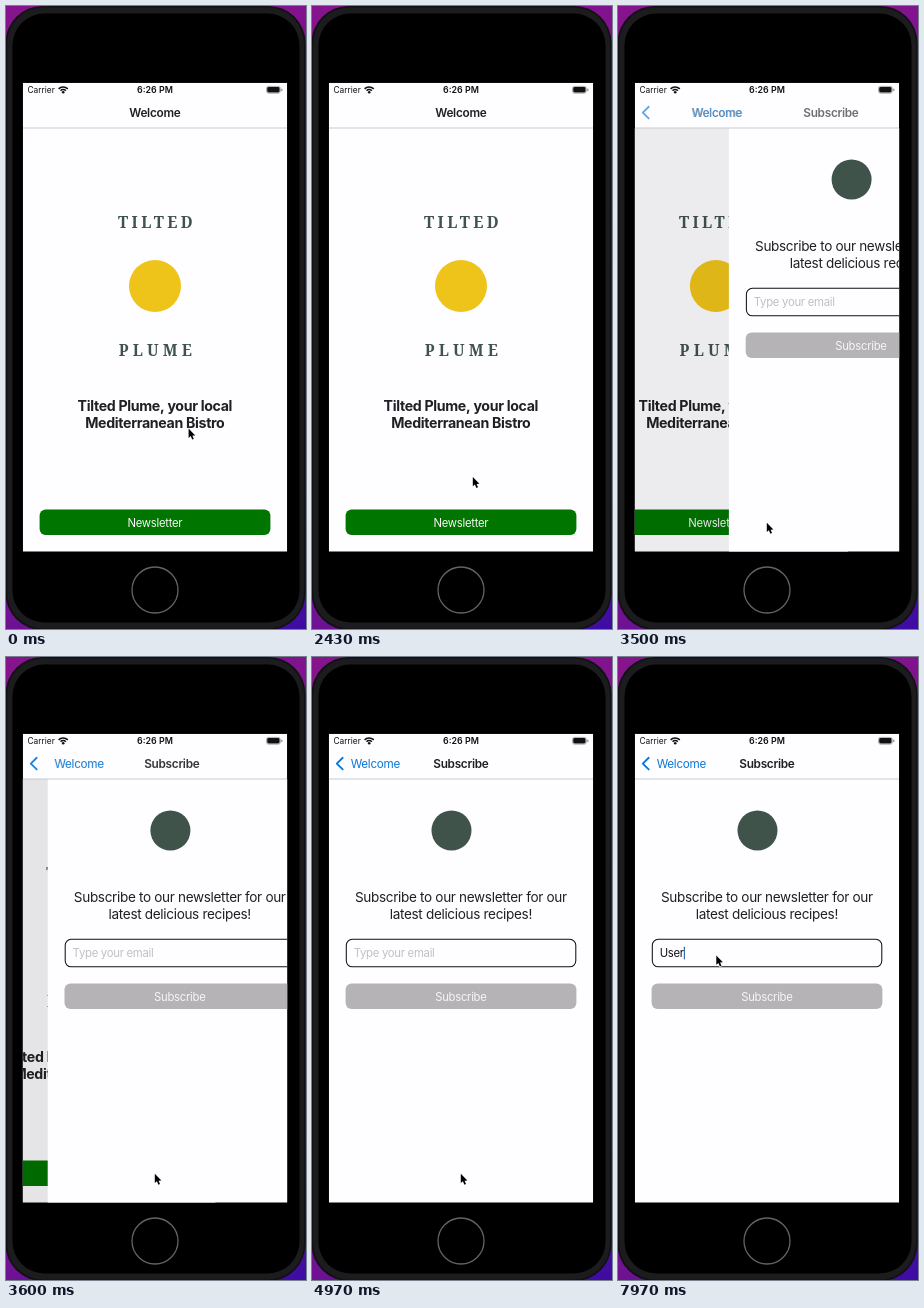
Recreate the animation shown at these times as an HTML page with a canvas. Size 300 by 623 pixels, loop 8 s.

```html
<!DOCTYPE html>
<html lang="en">
<head>
<meta charset="utf-8">
<title>Newsletter sign-up</title>
<style>
  html, body { margin: 0; width: 100%; height: 100%; overflow: hidden; background: #000; }
  canvas { display: block; width: 300px; height: 623px; }
</style>
</head>
<body>
<canvas id="stage"></canvas>
<script>
const W = 300, H = 623, LOOP = 8000;
const SCREEN = { x: 16.8, y: 76.8, w: 264.4, h: 468.8 };
const NAV_BOTTOM = 122;
const BLUE = '#0a78d8', INK = '#202024', GREEN = '#007500', GREY = '#b5b3b6';
const PAPER = '#fefdff', SLATE = '#40534b', YELLOW = '#efc41a';
const SANS = 'Inter, sans-serif', SERIF = '"Noto Serif", serif';

const canvas = document.getElementById('stage');
const ctx = canvas.getContext('2d');
const dpr = window.devicePixelRatio || 1;
canvas.width = W * dpr;
canvas.height = H * dpr;

const clamp = v => Math.max(0, Math.min(1, v));
const smooth = v => { v = clamp(v); return v * v * (3 - 2 * v); };
const mix = (a, b, k) => a + (b - a) * k;

function box(x, y, w, h, r, fill, stroke, line = 1) {
  ctx.beginPath();
  ctx.roundRect(x, y, w, h, r);
  if (fill) { ctx.fillStyle = fill; ctx.fill(); }
  if (stroke) { ctx.strokeStyle = stroke; ctx.lineWidth = line; ctx.stroke(); }
}

function disc(x, y, r, fill, stroke, line = 1) {
  ctx.beginPath();
  ctx.arc(x, y, r, 0, Math.PI * 2);
  if (fill) { ctx.fillStyle = fill; ctx.fill(); }
  if (stroke) { ctx.strokeStyle = stroke; ctx.lineWidth = line; ctx.stroke(); }
}

// Returns the advance width of the text.
function text(str, x, y, size, { weight = 400, color = INK, align = 'center', family = SANS, gap = -0.024 * size } = {}) {
  ctx.font = `${weight} ${size}px ${family}`;
  ctx.letterSpacing = gap + 'px';
  ctx.textAlign = 'left';
  ctx.fillStyle = color;
  const width = ctx.measureText(str).width;
  ctx.fillText(str, align === 'center' ? x - (width - gap) / 2 : x, y);
  return width;
}

function faded(alpha, draw) {
  ctx.save();
  ctx.globalAlpha = clamp(alpha);
  draw();
  ctx.restore();
}

function drawPhone() {
  const wall = ctx.createLinearGradient(0, 0, W, H);
  wall.addColorStop(0, '#86148c');
  wall.addColorStop(0.8, '#701292');
  wall.addColorStop(1, '#3c0ca4');
  ctx.fillStyle = wall;
  ctx.fillRect(0, 0, W, H);
  box(-0.5, 0, 300, 624, 37, '#111013');
  box(1.2, 1.6, 296.8, 621, 36, '#1c1b1d');
  box(6.5, 7.5, 287, 609, 32, '#000');
  disc(149, 584, 23, null, '#646464', 1.3);
}

function drawStatusBar() {
  text('Carrier', 21.5, 87, 8.4, { align: 'left', gap: 0, color: '#111' });
  text('6:26 PM', 149, 87.2, 8.9, { weight: 600, gap: 0, color: '#111' });

  ctx.strokeStyle = '#111';
  ctx.lineWidth = 1.5;
  for (const r of [3.6, 6.3]) {
    ctx.beginPath();
    ctx.arc(57.2, 87.2, r, -Math.PI * 0.76, -Math.PI * 0.24);
    ctx.stroke();
  }
  disc(57.2, 86.2, 1.3, '#111');

  box(260.5, 80.4, 13.8, 6.8, 2, null, '#999', 0.8);
  box(261.2, 81.1, 12.4, 5.4, 1.4, '#111');
  box(275.2, 82.4, 1.2, 2.8, 0.6, '#888');
}

function drawNav(p) {
  ctx.fillStyle = PAPER;
  ctx.fillRect(SCREEN.x, SCREEN.y, SCREEN.w, NAV_BOTTOM - SCREEN.y);
  ctx.fillStyle = '#cbcad0';
  ctx.fillRect(SCREEN.x, NAV_BOTTOM - 0.5, SCREEN.w, 1);

  const titleX = mix(149, 63.5, Math.pow(p, 1.22));
  faded(1 - p, () => text('Welcome', titleX, 110.8, 11.8, { weight: 600 }));
  faded(p, () => {
    text('Welcome', titleX, 110.8, 11.7, { color: BLUE });
    text('Subscribe', mix(329, 149, p), 110.8, 11.8, { weight: 600 });
    ctx.beginPath();
    ctx.moveTo(30.7, 100.8);
    ctx.lineTo(24.8, 106.6);
    ctx.lineTo(30.7, 112.4);
    ctx.strokeStyle = BLUE;
    ctx.lineWidth = 1.9;
    ctx.lineCap = 'round';
    ctx.lineJoin = 'round';
    ctx.stroke();
  });
}

function fillPage() {
  ctx.fillStyle = PAPER;
  ctx.fillRect(SCREEN.x, NAV_BOTTOM, SCREEN.w, SCREEN.h);
}

function drawButton(label, y, fill) {
  box(33.6, y - 0.4, 230.8, 25.5, 6, fill);
  text(label, 149, y + 16.9, 11.3, { color: '#f5f6f5' });
}

function drawWelcome() {
  fillPage();
  const sign = { weight: 800, family: SERIF, color: SLATE };
  text('TILTED', 149.3, 221.5, 15.5, { ...sign, gap: 3.4 });
  text('PLUME', 149.3, 350, 15.5, { ...sign, gap: 4.2 });
  disc(149, 280, 26, YELLOW);
  text('Tilted Plume, your local', 149, 405.1, 14.2, { weight: 700 });
  text('Mediterranean Bistro', 149, 421.8, 14.2, { weight: 700 });
  drawButton('Newsletter', 504, GREEN);
}

const KEYS = [[7020, 'U'], [7330, 's'], [7620, 'e'], [7800, 'r']];

function drawSubscribe(t) {
  fillPage();
  disc(139.5, 173.5, 20, SLATE);
  text('Subscribe to our newsletter for our', 149, 245, 13.55);
  text('latest delicious recipes!', 149, 261.7, 13.55);

  box(34.3, 282.3, 229.5, 27.5, 6, null, '#111', 1.05);
  const typed = KEYS.filter(k => t >= k[0]).map(k => k[1]).join('');
  const width = typed
    ? text(typed, 41.7, 300.2, 11.3, { align: 'left', color: '#111' })
    : 0;
  if (!typed) text('Type your email', 41.7, 300.2, 11.3, { align: 'left', color: '#c0bfc3' });
  if (t >= 6580) box(41.7 + width, 289.8, 1.1, 12.6, 0.5, '#2a5fb4');

  drawButton('Subscribe', 327, GREY);
}

// Critically damped push of the second page.
function pushProgress(t) {
  const s = 17.7 * Math.max(0, t - 3377) / 1000;
  const left = (1 + s) * Math.exp(-s);
  return left < 0.0015 ? 1 : 1 - left;
}

function drawScreen(t) {
  const p = pushProgress(t);
  ctx.save();
  ctx.beginPath();
  ctx.rect(SCREEN.x, SCREEN.y, SCREEN.w, SCREEN.h);
  ctx.clip();
  if (p < 1) {
    ctx.save();
    ctx.translate(-0.3 * SCREEN.w * p, 0);
    drawWelcome();
    ctx.restore();
    ctx.fillStyle = `rgba(0,0,0,${0.11 * p})`;
    ctx.fillRect(SCREEN.x, NAV_BOTTOM, SCREEN.w, SCREEN.h);
  }
  if (p > 0) {
    ctx.save();
    ctx.translate(SCREEN.w * (1 - p), 0);
    drawSubscribe(t);
    ctx.restore();
  }
  drawNav(p);
  drawStatusBar();
  ctx.restore();
}

function pointerAt(t) {
  if (t < 4000) {
    const k = smooth((t - 1930) / 1000), j = 1 - k;
    const bend = (a, b, c) => j * j * a + 2 * j * k * b + k * k * c;
    return [bend(182.6, 156, 148.8), bend(422.6, 472, 516.7)];
  }
  const k = smooth((t - 5000) / 1250);
  return [mix(148.8, 98.3, k), mix(516.7, 298.4, k)];
}

function drawPointer(t) {
  const [x, y] = pointerAt(t);
  const press = [[3250, 3400], [6330, 6570]].find(([a, b]) => t >= a && t < b);
  if (press) {
    faded((press[1] - t) / 60, () => disc(x, y + 1, 14, 'rgba(150,146,152,0.5)', 'rgba(110,108,112,0.6)', 0.8));
  }
  ctx.save();
  ctx.translate(x, y);
  ctx.beginPath();
  [[0, 0], [0, 9.4], [2.1, 7.5], [3.6, 11], [5.2, 10.3], [3.8, 7], [6.6, 6.8]]
    .forEach(([px, py]) => ctx.lineTo(px, py));
  ctx.closePath();
  ctx.strokeStyle = '#fff';
  ctx.lineWidth = 1.4;
  ctx.lineJoin = 'round';
  ctx.stroke();
  ctx.fillStyle = '#000';
  ctx.fill();
  ctx.restore();
}

function frame() {
  const t = performance.now() % LOOP;
  ctx.setTransform(dpr, 0, 0, dpr, 0, 0);
  drawPhone();
  drawScreen(t);
  drawPointer(t);
  requestAnimationFrame(frame);
}
frame();
</script>
</body>
</html>
```
